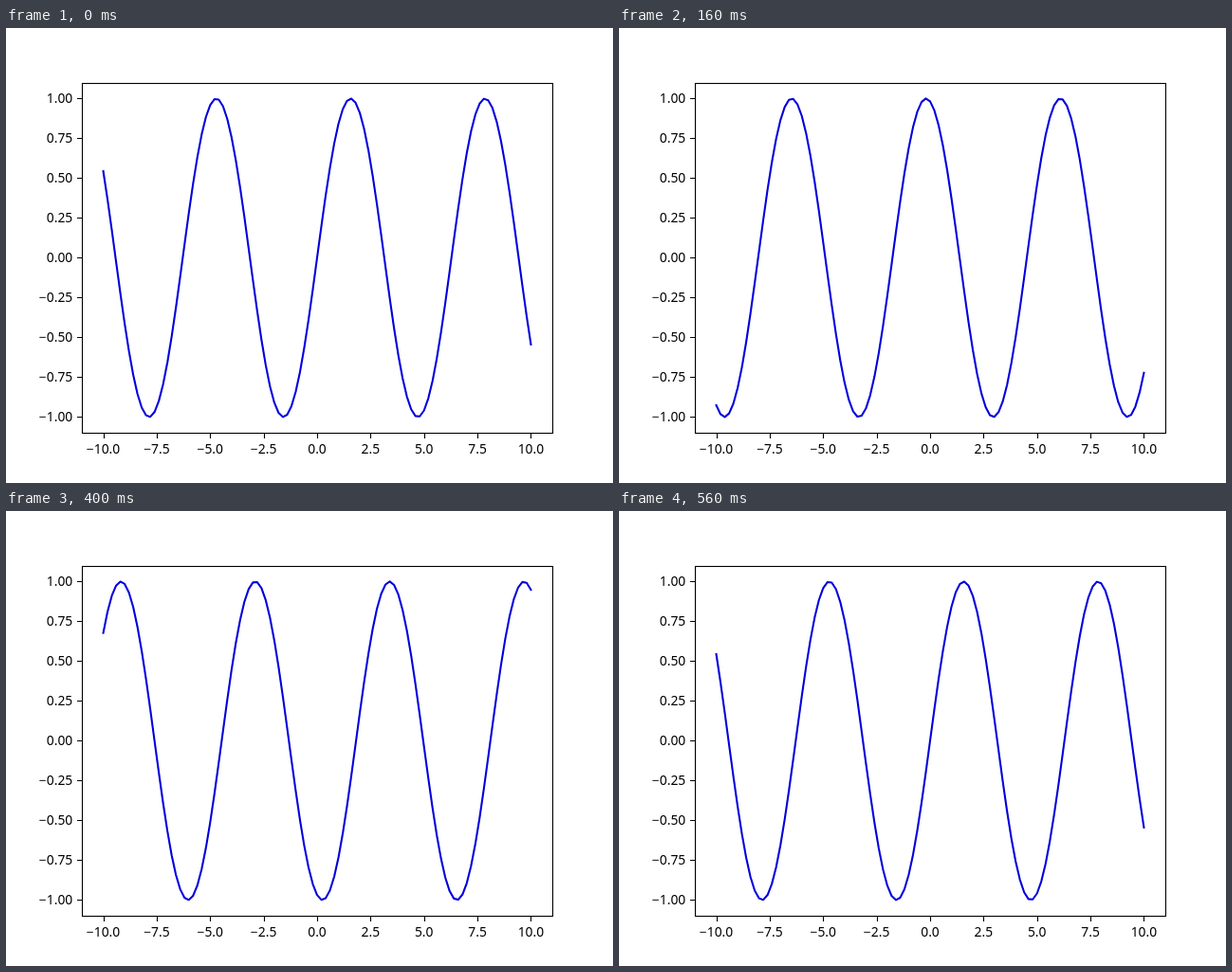
An HTML page that plays this animation: 640x480 px, repeating every 0.64 s.

```html
<!DOCTYPE html>
<html lang="en">
<head>
<meta charset="utf-8">
<title>Travelling sine wave</title>
<style>
  html, body { margin: 0; width: 100%; height: 100%; overflow: hidden; background: #fff; }
  svg { display: block; width: 640px; height: 480px; }
  text { font: 13.89px "Noto Sans", "Open Sans", sans-serif; fill: #000; }
  .axis { fill: none; stroke: #000; stroke-width: 1.11; }
  .wave { fill: none; stroke: #0000dc; stroke-width: 2.08; stroke-linejoin: round; stroke-linecap: square; }
</style>
</head>
<body>
<svg viewBox="0 0 640 480">
  <path id="wave" class="wave"/>
  <path id="ticks" class="axis"/>
  <rect class="axis" x="80.5" y="58.5" width="496" height="369"/>
  <g id="labels"></g>
</svg>
<script>
const STEP_MS = 80, STEPS = 8, SAMPLES = 100;
const wave = document.getElementById('wave');
const labels = document.getElementById('labels');

const toX = v => 328 + v * 496 / 22;
const toY = v => 242.4 - v * 168;
const snap = p => Math.round(p) + 0.5;

function label(value, digits, x, y, anchor) {
  const el = document.createElementNS('http://www.w3.org/2000/svg', 'text');
  el.setAttribute('x', x);
  el.setAttribute('y', y);
  el.setAttribute('text-anchor', anchor);
  el.textContent = value.toFixed(digits).replace('-', '\u2212');
  labels.append(el);
}

function drawAxes() {
  let d = '';
  for (let i = -4; i <= 4; i++) {
    const x = toX(i * 2.5), y = toY(i / 4);
    d += `M${snap(x)} 428v5M80 ${snap(y)}h-5`;
    label(i * 2.5, 1, x, 449, 'middle');
    label(i / 4, 2, 70.3, Math.round(y) + 5, 'end');
  }
  document.getElementById('ticks').setAttribute('d', d);
}

function drawWave(ms) {
  const step = Math.floor(ms / STEP_MS) % STEPS;
  // Phase moves in whole hundredths of a turn.
  const phase = 2 * Math.PI * Math.floor(100 * step / (STEPS - 1)) / 100;
  const points = [];
  for (let i = 0; i <= SAMPLES; i++) {
    const v = -10 + i * 20 / SAMPLES;
    points.push(toX(v).toFixed(2) + ' ' + toY(Math.sin(v + phase)).toFixed(2));
  }
  wave.setAttribute('d', 'M' + points.join('L'));
}

drawAxes();
const start = performance.now();
function tick() {
  drawWave(performance.now() - start);
  requestAnimationFrame(tick);
}
tick();
</script>
</body>
</html>
```
